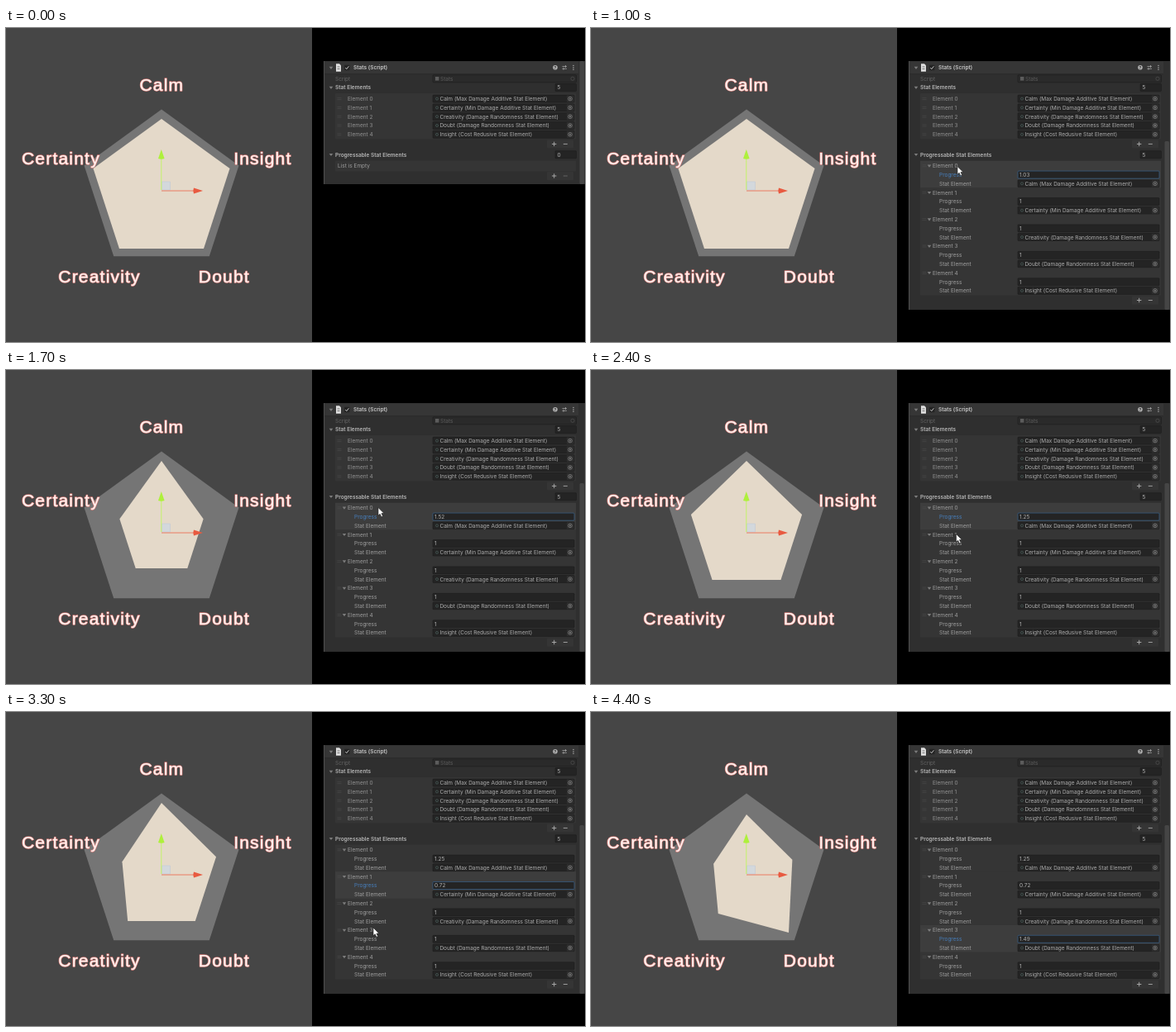
Write an HTML page that moves like this. It is 700 px wide and 380 px high and loops after 4.5 s.

```html
<!DOCTYPE html>
<html lang="en">
<head>
<meta charset="utf-8">
<title>Stat chart</title>
<style>
html, body { margin: 0; width: 100%; height: 100%; overflow: hidden; background: #000; }
svg { display: block; width: 700px; height: 380px; }
.ui { font: 6.5px Inter, Roboto, sans-serif; }
.name { font: 21px "Liberation Sans", Arial, sans-serif; letter-spacing: 1.2px; stroke-linejoin: round; }
.glow { fill: #e08a86; stroke: #d97a76; stroke-width: 1.5px; }
.face { fill: #fff1ee; stroke: #fff1ee; stroke-width: .25px; }
</style>
</head>
<body>
<svg id="stage" viewBox="0 0 700 380" xmlns="http://www.w3.org/2000/svg"></svg>
<script>
const LOOP = 4500, STEP = 100, LAG = 200;
const CENTER = [188, 196.8], OUTER = 98.3, INNER = 86.8;
const NAMES = ['Calm', 'Certainty', 'Creativity', 'Doubt', 'Insight'];
const KINDS = ['Max Damage Additive', 'Min Damage Additive', 'Damage Randomness',
  'Damage Randomness', 'Cost Redusive'];
const AXES = [0, 4, 3, 2, 1]; // clockwise corner of each stat
const BODY = '#353535', ACTIVE = '#3d3d3d';

// [time, value] keys
const VALUES = {
  0: [[900, 1], [1000, 1.03], [1500, 1.63], [1700, 1.52], [1900, 1.25], [2100, 1.23], [2200, 1.23], [2300, 1.25]],
  1: [[2700, 1], [2800, .84], [2900, .72]],
  3: [[3600, 1], [3800, 1.31], [4000, 1.45], [4100, 1.49]]
};
const CURSOR = [[400, 640, 166], [500, 674, 152], [600, 674, 152], [700, 610, 160], [900, 446, 169],
  [1000, 443, 167.5], [1300, 447, 167], [1500, 454, 167], [1700, 450, 166.5], [1900, 440, 168],
  [2100, 438, 170], [2300, 441, 189], [2400, 441.5, 198.5], [2600, 442, 198], [2900, 432, 196.5],
  [3000, 432, 197], [3300, 444, 261], [3600, 440, 264], [3800, 448, 264], [4100, 455, 265]];
const FOCUS = [[0, -1], [900, 0], [2600, 1], [3500, 3]];

const stage = document.getElementById('stage');

function add(parent, tag, attrs, text) {
  const el = document.createElementNS('http://www.w3.org/2000/svg', tag);
  for (const k in attrs) el.setAttribute(k, attrs[k]);
  if (text !== undefined) el.textContent = text;
  parent.appendChild(el);
  return el;
}
const group = p => add(p, 'g', {});
const rect = (p, x, y, width, height, fill, more = {}) =>
  add(p, 'rect', { x, y, width, height, fill, ...more });
const path = (p, d, more) => add(p, 'path', { d, ...more });
const line = (p, d, stroke, w = .8) => path(p, d, { fill: 'none', stroke, 'stroke-width': w });
const label = (p, x, y, text, fill = '#a0a0a0', more = {}) =>
  add(p, 'text', { x, y: y + 2.4, fill, class: 'ui', ...more }, text);
const bold = { style: 'font-weight:600' };

function corners(radii) {
  return radii.map((r, i) => {
    const a = i * Math.PI * 2 / 5;
    return (CENTER[0] + r * Math.sin(a)).toFixed(2) + ',' + (CENTER[1] - r * Math.cos(a)).toFixed(2);
  }).join(' ');
}

function sample(keys, t) {
  let i = keys.findIndex(k => k[0] > t);
  if (i === 0) return keys[0].slice(1);
  if (i < 0) return keys[keys.length - 1].slice(1);
  const a = keys[i - 1], b = keys[i], f = (t - a[0]) / (b[0] - a[0]);
  return a.slice(1).map((v, n) => v + (b[n + 1] - v) * f);
}
const stat = (i, t) => VALUES[i] ? sample(VALUES[i], t)[0] : 1;

// Chart
rect(stage, 0, 0, 370, 380, '#464646');
add(stage, 'polygon', { points: corners(Array(5).fill(OUTER)), fill: '#757575' });
const shape = add(stage, 'polygon', { fill: '#e4d9c9' });
[[161.5, 76], [19, 165], [63.3, 308.3], [232.8, 308.3], [275.2, 165]].forEach(([x, y], i) => {
  for (const c of ['glow', 'face']) add(stage, 'text', { x, y, class: 'name ' + c }, NAMES[i]);
});
rect(stage, 188.5, 186, 10, 10, '#d3d8dc', { stroke: '#c0cad6', 'stroke-width': .6 });
line(stage, 'M187.8 196V158', '#c4f26a', 1);
path(stage, 'M187.8 147l3.8 11q-3.8 1.6-7.6 0z', { fill: '#aef03c' });
line(stage, 'M188 197H228', '#ea7a62', 1);
path(stage, 'M238 197l-11-3.6q-1.4 3.6 0 7.2z', { fill: '#e85a40' });

// Inspector
const panel = rect(stage, 384, 40, 316, 149, '#2f2f2f');
const edge = rect(stage, 384, 40, 1.2, 149, '#4c4c4c');
const thumb = rect(stage, 693.5, 40, 5.5, 149, '#454545', { rx: 1.5 });
const box = (p, x, y, w, fill = '#242424') =>
  rect(p, x, y - 4.5, w, 9, fill, { rx: 1, stroke: '#1c1c1c', 'stroke-width': .6 });
const fold = (p, x, y) => path(p, `M${x - 2.3} ${y - 1.3}h4.6l-2.3 3.2z`, { fill: '#7c7c7c' });
const grip = (p, y) => line(p, `M400.5 ${y - 1}h5M400.5 ${y + 1}h5`, '#4c4c4c', .6);

function objectField(p, i, y) {
  box(p, 516, y, 171);
  add(p, 'circle', { cx: 521, cy: y, r: 1.5, fill: 'none', stroke: '#4c605d', 'stroke-width': .7 });
  label(p, 524.4, y, `${NAMES[i]} (${KINDS[i]} Stat Element)`, '#adadad');
  rect(p, 678, y - 4, 8.5, 8, '#2e2e2e');
  add(p, 'circle', { cx: 682, cy: y, r: 2.3, fill: 'none', stroke: '#8c8c8c', 'stroke-width': .7 });
  add(p, 'circle', { cx: 682, cy: y, r: .9, fill: '#8c8c8c' });
}
function listHead(y, text, count) {
  fold(stage, 393, y);
  label(stage, 398, y, text, '#b8b8b8', bold);
  box(stage, 664, y, 25.5);
  return label(stage, 666.5, y, count, '#b4b4b4');
}
function listFoot(p, y, minus = '#aaa') {
  rect(p, 654, y - 5.2, 32, 10.4, BODY, { rx: 1 });
  line(p, `M660 ${y}h5.4M662.7 ${y - 2.7}v5.4`, '#b0b0b0', .9);
  line(p, `M673.8 ${y}h5`, minus, .9);
}

rect(stage, 385, 40.5, 307, 15, '#363636');
line(stage, 'M385 55.7H692', '#252525', .6);
fold(stage, 393, 48);
path(stage, 'M399 43.3h4l2 2v7.4h-6z', { fill: '#dedede' });
line(stage, 'M400.5 47h3M400.5 49.5h3', '#565656', .8);
rect(stage, 409, 44.8, 6.5, 6.5, '#242424', { rx: 1 });
line(stage, 'M410.3 48l1.5 1.7 2.6-3.4', '#d0d0d0', .9);
label(stage, 420, 48, 'Stats (Script)', '#c8c8c8', bold);
add(stage, 'circle', { cx: 664, cy: 47.8, r: 2.8, fill: '#b0b0b0' });
label(stage, 662.5, 47.4, '?', '#333', { style: 'font-size:5px;font-weight:700' });
line(stage, 'M672.5 46.5h5.5M672.5 49.3h5.5M676.5 45v3M674 47.8v3', '#a0a0a0', .8);
for (const y of [45.5, 47.9, 50.3]) add(stage, 'circle', { cx: 686, cy: y, r: .75, fill: '#aaa' });

label(stage, 398, 61.3, 'Script', '#646464');
box(stage, 516, 61.3, 173.5, '#2a2a2a');
rect(stage, 519, 59, 4.4, 4.6, '#5c5c5c');
label(stage, 525, 61.3, 'Stats', '#5c5c5c');
add(stage, 'circle', { cx: 685, cy: 61.3, r: 2.1, fill: 'none', stroke: '#555', 'stroke-width': .6 });

listHead(72, 'Stat Elements', '5');
rect(stage, 398, 79, 291, 55.5, BODY, { rx: 1 });
NAMES.forEach((n, i) => {
  const y = 85.6 + i * 10.8;
  grip(stage, y);
  label(stage, 413, y, 'Element ' + i, '#929292');
  objectField(stage, i, y);
});
listFoot(stage, 140.4);
const count = listHead(153.2, 'Progressable Stat Elements', '0');

const empty = group(stage);
rect(empty, 398, 160.5, 291, 13, BODY, { rx: 1 });
label(empty, 401, 166.7, 'List is Empty', '#9c9c9c');
listFoot(empty, 179, '#6a6a6a');

const filled = group(stage);
rect(filled, 398, 160.5, 291, 163, BODY, { rx: 1 });
const rows = NAMES.map((n, i) => {
  const y = 166.8 + i * 32.4;
  const back = rect(filled, 398, y - 6, 291, 33, BODY);
  grip(filled, y);
  fold(filled, 409, y);
  label(filled, 413, y, 'Element ' + i, '#9e9e9e');
  const title = label(filled, 421, y + 10.8, 'Progress');
  const field = box(filled, 516, y + 10.8, 171);
  const value = label(filled, 518, y + 10.8, '1', '#b2b2b2');
  label(filled, 421, y + 21.5, 'Stat Element');
  objectField(filled, i, y + 21.5);
  return { back, title, field, value };
});
listFoot(filled, 329.5);

const cursor = path(stage, 'M0 0V9.6l2.2-1.9 1.6 3.6 1.8-.8-1.6-3.5H7z',
  { fill: '#fff', stroke: '#1c1c1c', 'stroke-width': .6 });

const show = (el, on) => el.setAttribute('visibility', on ? 'visible' : 'hidden');

function draw(time) {
  const t = Math.floor(time % LOOP / STEP) * STEP;
  const open = t >= 600;
  const focus = FOCUS.filter(k => k[0] <= t).pop()[1];

  const stats = NAMES.map((n, i) => stat(i, t - LAG));
  const top = Math.max(...stats);
  shape.setAttribute('points', corners(AXES.map(i => INNER * stats[i] / top)));

  for (const el of [panel, edge]) el.setAttribute('height', open ? 301 : 149);
  thumb.setAttribute('y', open ? 137 : 40);
  thumb.setAttribute('height', open ? 204 : 149);
  show(empty, !open);
  show(filled, open);
  count.textContent = t >= 500 ? '5' : '0';

  rows.forEach((row, i) => {
    const on = i === focus;
    row.back.setAttribute('fill', on ? ACTIVE : BODY);
    row.title.setAttribute('fill', on ? '#477fbc' : '#a0a0a0');
    row.field.setAttribute('stroke', on ? '#38699a' : '#1c1c1c');
    row.value.textContent = +stat(i, t).toFixed(2);
  });

  const [x, y] = sample(CURSOR, t);
  cursor.setAttribute('transform', `translate(${x} ${y})`);
  show(cursor, t >= 400 && t < 4200);
}

let start;
function tick(now) {
  if (start === undefined) start = now;
  draw(now - start);
  requestAnimationFrame(tick);
}
draw(0);
requestAnimationFrame(tick);
</script>
</body>
</html>
```
